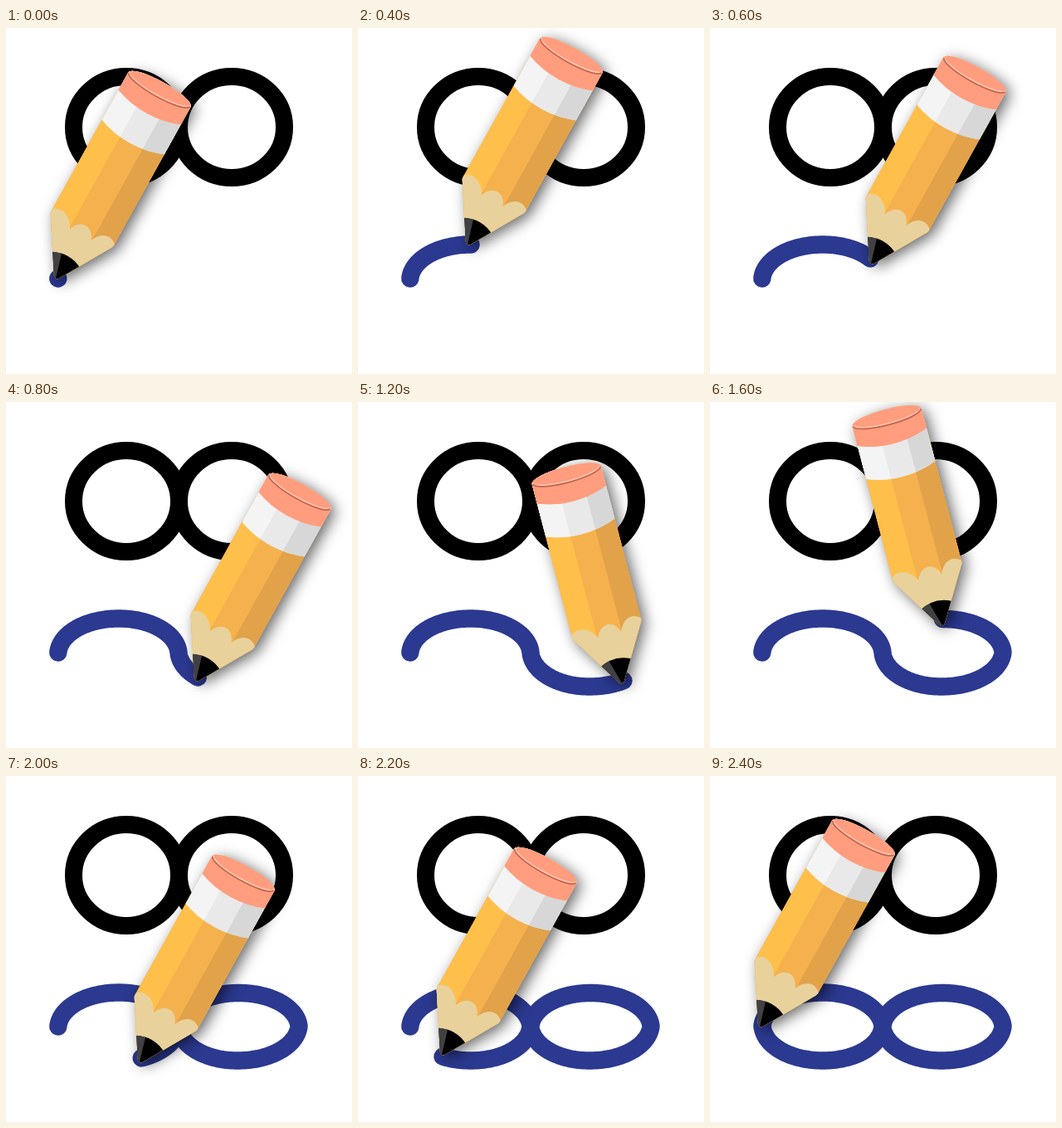
An HTML page with a canvas for the animation above (6.4 s loop, 417 by 417 pixels).

```html
<!DOCTYPE html>
<html lang="en">
<head>
<meta charset="utf-8">
<title>Pencil drawing a loop</title>
<style>
html, body { margin: 0; width: 100%; height: 100%; overflow: hidden; background: #fff; }
canvas { display: block; width: 417px; height: 417px; }
</style>
</head>
<body>
<canvas id="stage" width="417" height="417"></canvas>
<script>
const ctx = document.getElementById('stage').getContext('2d');
const LOOP = 6400, STEP = 200;
const RIGHT = 29 * Math.PI / 180, LEFT = -14.7 * Math.PI / 180;

// Pencil tip x, y and the distance travelled along the figure eight in degrees
const poses = [
  [61, 302, 0], [86, 278, 47], [133, 261, 90], [195, 284, 144],
  [230, 336, 227], [268, 344, 266], [319, 338.4, 304], [348, 292, 374],
  [281, 269, 450], [208, 300, 540], [162, 345, 608], [102, 336, 658],
  [61, 302, 720]
];
const leansLeft = i => i >= 6 && i <= 8;

// Quarter points of the figure eight: sides on even places, tops and bottoms on odd
const nodes = [
  [62.8, 302], [136, 261], [208, 302], [279, 343], [353, 301.5],
  [280.5, 261.5], [208, 302], [136, 343], [63.2, 302]
];

// Pencil space: tip at the origin, body pointing up
const MID = -2, HALF = 43, L = MID - HALF, R = MID + HALF;
const TOP = -259.3, RIM = 10, SAG = 18;
const FACETS = [L - 1, -16, 15, R + 1];

function fill(color) {
  ctx.fillStyle = color;
  ctx.fill();
}

function rings() {
  ctx.strokeStyle = '#000';
  ctx.lineWidth = 21;
  for (const x of [145, 272]) {
    ctx.beginPath();
    ctx.ellipse(x, 119.5, 63.5, 61, 0, 0, Math.PI * 2);
    ctx.stroke();
  }
}

// Handles are nearly upright at the sides and level at tops and bottoms
function handle([x, y], [tx, ty], isSide) {
  const fx = isSide ? 0.03 : 0.55, fy = isSide ? 0.55 : 0;
  return [x + (tx - x) * fx, y + (ty - y) * fy];
}

function loopPoint(deg) {
  const q = Math.min(7, Math.floor(deg / 90));
  const t = deg / 90 - q, u = 1 - t;
  const a = nodes[q], d = nodes[q + 1], side = q % 2 === 0;
  const b = handle(a, d, side), c = handle(d, a, !side);
  return [0, 1].map(k =>
    u * u * u * a[k] + 3 * u * u * t * b[k] + 3 * u * t * t * c[k] + t * t * t * d[k]);
}

function trail(end) {
  ctx.beginPath();
  ctx.moveTo(...loopPoint(0));
  for (let d = 2; d < end; d += 2) ctx.lineTo(...loopPoint(d));
  ctx.lineTo(...loopPoint(end));
  ctx.strokeStyle = '#2b3990';
  ctx.lineWidth = 21.4;
  ctx.lineCap = ctx.lineJoin = 'round';
  ctx.stroke();
}

function outline() {
  ctx.beginPath();
  ctx.moveTo(L, TOP);
  ctx.ellipse(MID, TOP, HALF, RIM, 0, Math.PI, Math.PI * 2);
  ctx.arcTo(R, -67, -1, 4, 8);
  ctx.arcTo(-1, 4, L, -66, 4);
  ctx.arcTo(L, -66, L, TOP, 5);
  ctx.closePath();
}

// Vertical facets that end in a curved lower edge
function band(bottom, colors) {
  ctx.save();
  ctx.beginPath();
  ctx.moveTo(L - 2, TOP - 20);
  ctx.lineTo(L - 2, bottom);
  ctx.quadraticCurveTo(MID, bottom + SAG, R + 2, bottom);
  ctx.lineTo(R + 2, TOP - 20);
  ctx.clip();
  paintFacets(colors);
  ctx.restore();
}

function paintFacets(colors) {
  ctx.fillStyle = colors[1];
  ctx.fillRect(L - 2, TOP - 20, HALF * 2 + 4, 300);
  ctx.fillStyle = colors[0];
  ctx.fillRect(FACETS[0], TOP - 20, FACETS[1] - FACETS[0], 300);
  ctx.fillStyle = colors[2];
  ctx.fillRect(FACETS[2], TOP - 20, FACETS[3] - FACETS[2], 300);
}

function wood() {
  ctx.beginPath();
  ctx.moveTo(L - 2, -69);
  ctx.bezierCurveTo(-38, -79, -23, -76, -15, -60);
  ctx.bezierCurveTo(-9, -76, 8, -78, 14, -60);
  ctx.bezierCurveTo(20, -76, 34, -79, R + 2, -68);
  ctx.lineTo(R + 2, 8);
  ctx.lineTo(L - 2, 8);
  ctx.closePath();
  fill('#e9d19b');
}

function lead() {
  ctx.beginPath();
  ctx.moveTo(-24, -23.5);
  ctx.quadraticCurveTo(-1, -37, 21, -23.5);
  ctx.lineTo(21, 8);
  ctx.lineTo(-24, 8);
  ctx.closePath();
  fill('#000');
  ctx.save();
  ctx.clip();
  ctx.beginPath();
  ctx.moveTo(-30, -40);
  ctx.lineTo(-11, -40);
  ctx.lineTo(-9, -28);
  ctx.lineTo(-1, 0);
  ctx.lineTo(-30, 4);
  ctx.closePath();
  fill('#414042');
  ctx.restore();
}

function rimLine(y, color, width) {
  ctx.beginPath();
  ctx.ellipse(MID, y, HALF - 1, RIM - 1, 0, 0.02, Math.PI - 0.02);
  ctx.strokeStyle = color;
  ctx.lineWidth = width;
  ctx.lineCap = 'butt';
  ctx.stroke();
}

function pencil(x, y, tilt) {
  ctx.save();
  ctx.translate(x, y);
  ctx.rotate(tilt);

  ctx.save();
  ctx.shadowColor = 'rgba(0,0,0,.6)';
  ctx.shadowBlur = 17;
  ctx.shadowOffsetX = 5;
  ctx.shadowOffsetY = 4;
  outline();
  fill('#f5b34f');
  ctx.restore();

  outline();
  ctx.clip();
  paintFacets(['#ffbf4b', '#f5b14d', '#e1a24a']);
  wood();
  lead();
  band(-194.5, ['#f4f4f4', '#e9e9e9', '#d7d7d7']);
  band(-235.8, ['#ff9d7e', '#ff9d7e', '#ff9d7e']);
  rimLine(TOP - 1.5, '#ffc9b6', 1.8);
  rimLine(TOP, '#c4664f', 1.8);
  ctx.restore();
}

function draw(ms) {
  const i = Math.min(poses.length - 1, Math.floor(ms / STEP));
  const [x, y, end] = poses[i];
  ctx.fillStyle = '#fff';
  ctx.fillRect(0, 0, 417, 417);
  rings();
  trail(end);
  pencil(x, y, leansLeft(i) ? LEFT : RIGHT);
}

const start = performance.now();
function tick() {
  draw((performance.now() - start) % LOOP);
  requestAnimationFrame(tick);
}
draw(0);
requestAnimationFrame(tick);
</script>
</body>
</html>
```
